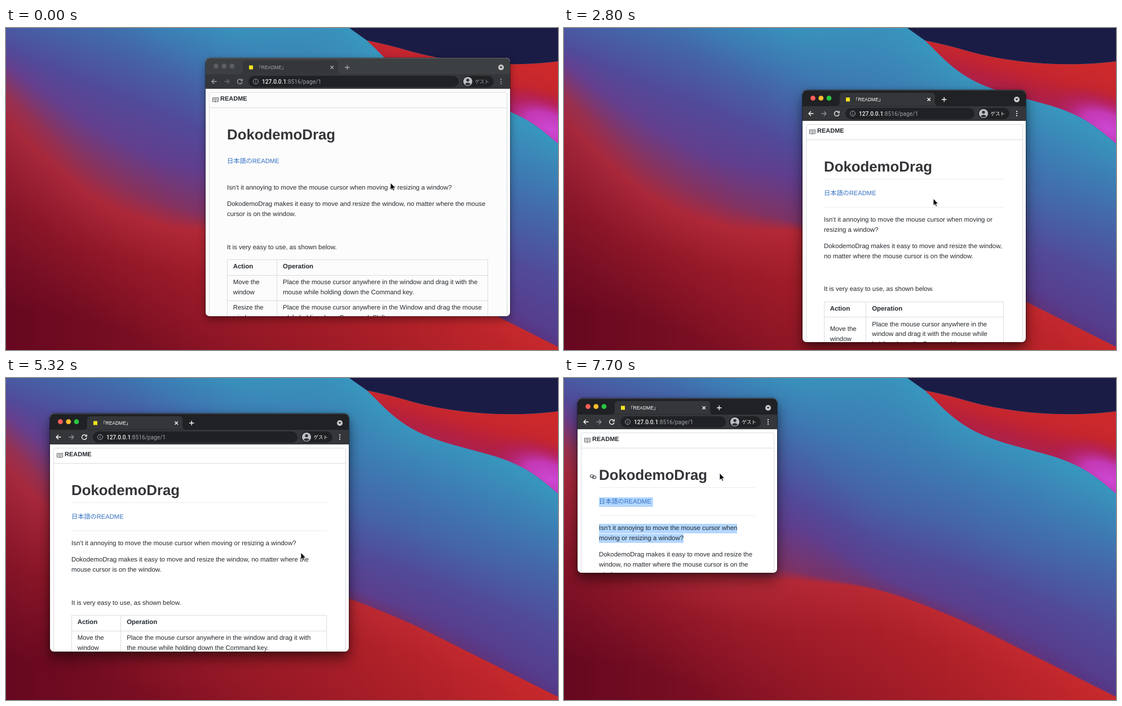
These frames come from a looping animation (979 px wide and 572 px high, 8 s). An HTML page with a canvas:

```html
<!DOCTYPE html>
<html lang="en">
<head>
<meta charset="utf-8">
<title>Window dragging</title>
<style>
html, body { margin: 0; width: 100%; height: 100%; overflow: hidden; background: #7a1026; }
#stage { position: absolute; left: 0; top: 0; width: 979px; height: 572px; overflow: hidden; }
#stage * { box-sizing: border-box; }
#win, #cursor { position: absolute; left: 0; top: 0; }
#win {
  --strip: #202124; color: #fff; border-radius: 7px;
  box-shadow: 0 0 0 .6px rgba(0,0,0,.7), 0 12px 24px rgba(0,0,0,.5), 0 2px 8px rgba(0,0,0,.2);
}
#win.idle {
  --strip: #3d4042; color: #a6a8ab;
  box-shadow: 0 0 0 .6px rgba(0,0,0,.6), 0 6px 14px rgba(0,0,0,.38);
}
#clip { position: absolute; inset: 0; overflow: hidden; border-radius: 7px; background: #fff; }
#clip::after { content: ""; position: absolute; inset: 0; height: 55px; border-radius: 7px 7px 0 0; box-shadow: inset 0 1px 0 rgba(255,255,255,.2); }
.idle #clip { background: #fcfcfc; }
.bar, #omni, .box, .body, .abs { position: absolute; }
.bar { left: 0; right: 0; top: 0; height: 28.5px; background: var(--strip); }
.tools { top: 28.5px; height: 26.5px; background: #35363a; }
#omni, #pill { position: absolute; top: 32px; height: 19.5px; border-radius: 10px; background: #202124; }
#omni { left: 76px; right: 91px; }
#pill { right: 29px; width: 56px; }
svg { position: absolute; top: 0; overflow: visible; }
svg text { fill: currentColor; stroke: none; font: 8.5px "Liberation Sans", "Noto Sans CJK JP", "Noto Sans CJK", sans-serif; }
svg .url { font: 500 10.2px Roboto, sans-serif; }
.idle .light { fill: #5c5e61; }
.box { left: 5.5px; right: 5.5px; top: 61px; bottom: -9px; border: 1px solid #d9dce0; border-radius: 3px; }
.box::before { content: ""; position: absolute; left: 0; right: 0; top: 26px; height: 1px; background: #d9dce0; }
.body {
  left: 38px; right: 39px; top: 0; color: #24292e; text-rendering: geometricPrecision; font-kerning: none;
  font: 11.45px/17.7px "Liberation Sans", "Noto Sans CJK JP", "Noto Sans CJK", Arial, sans-serif;
}
.head { left: -12px; top: 65.4px; font-weight: bold; font-size: 11px; }
h1 { position: absolute; margin: 0; top: 121.5px; left: 0; font-size: 25.8px; line-height: 30px; color: #333438; }
.rule { left: 0; right: 0; height: 1px; background: #eaecef; }
.idle .rule { display: none; }
.link { top: 176.2px; color: #3270c2; font-size: 11.2px; white-space: nowrap; }
.flow { position: absolute; top: 223.2px; left: 0; right: 0; }
p { margin: 0 0 11.6px; min-height: 17.7px; }
.sel { background: #b3d7ff; padding: 2.4px 0; }
.link .sel { padding-right: 3px; }
table { width: 100%; border-collapse: collapse; table-layout: fixed; }
td, th { border: 1px solid #d9dce0; padding: 4.4px 9.7px; text-align: left; vertical-align: middle; }
</style>
</head>
<body>
<div id="stage">
<canvas id="bg" width="979" height="572"></canvas>
<div id="win"><div id="clip">
  <div class="bar"></div><div class="bar tools"></div><div id="omni"></div><div id="pill"></div>
  <svg width="270" height="55" fill="none" stroke="currentColor" stroke-width="1.3">
    <g stroke="none">
      <circle class="light" cx="18.5" cy="14.7" r="4.4" fill="#ff5f57"/>
      <circle class="light" cx="32.8" cy="14.7" r="4.4" fill="#febc2e"/>
      <circle class="light" cx="47" cy="14.7" r="4.4" fill="#28c840"/>
      <path fill="#35363a" d="M60 28.5q6 0 6-6V11q0-6 6-6H229q6 0 6 6V22.5q0 6 6 6Z"/>
      <rect x="77" y="13.5" width="7" height="7" fill="#f4e51c"/>
    </g>
    <text x="90" y="20">「README」</text>
    <path d="M221.5 14.3l5.4 5.4m0-5.4l-5.4 5.4M247 17h8.4M251.2 12.8v8.4"/>
    <path d="M19.5 42H11m4-4l-4 4 4 4"/>
    <path opacity=".45" d="M33.5 42H42m-4-4l4 4-4 4"/>
    <path d="M64 39.2A4.3 4.3 0 1 0 65 43M65.2 37.4v3.3h-3.3"/>
    <g stroke="#a5a8ac" stroke-width="1"><circle cx="89" cy="42" r="4.5"/><path d="M89 41.4v3M89 39.2v1"/></g>
    <text class="url" x="100" y="45.6" style="fill:#f1f2f3">127.0.0.1<tspan style="fill:#9da1a6;font-weight:400">:8516/page/1</tspan></text>
  </svg>
  <svg width="100" height="55" style="right:0" fill="currentColor">
    <circle cx="84" cy="17" r="5" fill="#c9cbcd"/><path d="M81.4 15.6h5.2L84 18.8Z" fill="#202124"/>
    <circle cx="25" cy="42" r="8" fill="#bdc1c6"/>
    <circle cx="25" cy="39.6" r="2.7" fill="#303236"/><path d="M19.6 46.4q5.4-5 10.8 0-5.4 5-10.8 0Z" fill="#303236"/>
    <text x="37.5" y="45.2">ゲスト</text>
    <circle cx="84" cy="38.2" r="1.1"/><circle cx="84" cy="42" r="1.1"/><circle cx="84" cy="45.8" r="1.1"/>
  </svg>
  <div class="box"></div>
  <svg width="30" height="90" fill="none" stroke="#444a50">
    <path d="M12.5 70.8h4q1 0 1 1 0-1 1-1h4v7h-4q-1 0-1 1 0-1-1-1h-4ZM17.5 72v6M14 73h2M14 75h2M19 73h2M19 75h2" stroke-width=".9"/>
    <g id="anchor" stroke-width="1.1"><rect x="22.5" y="136" width="6.4" height="4.6" rx="2.3"/><rect x="26.4" y="138" width="6.4" height="4.6" rx="2.3"/></g>
  </svg>
  <div class="body">
    <div class="abs head">README</div>
    <h1>DokodemoDrag</h1>
    <div class="abs rule" style="top:158px"></div>
    <div class="abs link"><span id="link">日本語のREADME</span></div>
    <div class="abs rule" style="top:208px"></div>
    <div class="flow">
      <p><span id="ask">Isn’t it annoying to move the mouse cursor when moving or resizing a window?</span></p>
      <p>DokodemoDrag makes it easy to move and resize the window, no matter where the mouse cursor is on the window.</p>
      <p></p>
      <p>It is very easy to use, as shown below.</p>
      <table>
        <tr><th id="col">Action</th><th>Operation</th></tr>
        <tr><td>Move the window</td><td>Place the mouse cursor anywhere in the window and drag it with the mouse while holding down the Command key.</td></tr>
        <tr><td>Resize the window</td><td>Place the mouse cursor anywhere in the Window and drag the mouse while holding down Command, Shift.</td></tr>
      </table>
    </div>
  </div>
</div></div>
<svg id="cursor" width="12" height="18"><path d="M0 0V12.5L2.8 9.9 4.8 14.3 6.7 13.5 4.8 9.2H8.7Z" fill="#000" stroke="#fff" stroke-width=".9"/></svg>
</div>
<script>
const $ = id => document.getElementById(id);
const mix = (a, b, k) => a + (b - a) * k;

// Wallpaper: colour contours, each with heights at evenly spaced columns
const contours = [
  ['3895bd', '3895bd', [-190, -130, -60, -10, -20, 78, 131, 205]],
  ['3d78b1', '3d7cb3', [-90, -50, 20, 75, 120, 170, 225, 280]],
  ['4563a7', '4565a8', [-25, 20, 70, 140, 215, 260, 310, 350]],
  ['514b9a', '514b99', [35, 95, 150, 215, 290, 335, 390, 450]],
  ['663f8e', '553d8d', [65, 165, 235, 270, 350, 405, 465, 545]],
  ['98304f', '553585', [120, 245, 310, 345, 376, 427, 495, 565]],
  ['a5283c', 'c7292c', [165, 290, 352, 362, 378, 429, 497, 567]],
  ['871528', 'c4272a', [320, 385, 430, 450, 450, 490, 540, 600]],
  ['660820', 'b82328', [500, 520, 572, 620, 640, 650, 700, 700]]
];

function spline(v, u) {
  const i = Math.min(v.length - 2, Math.floor(u)), k = u - i;
  const b = v[i], c = v[i + 1], a = v[i - 1] ?? 2 * b - c, d = v[i + 2] ?? 2 * c - b;
  return b + k / 2 * (c - a + k * (2 * a - 5 * b + 4 * c - d + k * (3 * (b - c) + d - a)));
}

function blend(a, b, k) {
  const part = (s, i) => parseInt(s.substr(i, 2), 16);
  return `rgb(${[0, 2, 4].map(i => Math.round(mix(part(a, i), part(b, i), k)))})`;
}

function paintWallpaper() {
  const g = $('bg').getContext('2d'), top = -240, span = 960;
  for (let x = 0; x < 979; x++) {
    const grad = g.createLinearGradient(0, top, 0, top + span);
    for (const [left, right, ys] of contours)
      grad.addColorStop((spline(ys, x / 978 * 7) - top) / span, blend(left, right, x / 978));
    g.fillStyle = grad;
    g.fillRect(x, 0, 1, 572);
  }
  const ridge = 'Q680 30 720 42C800 64 900 70 979 59';
  const band = new Path2D('M609 0L640 22' + ridge + 'V205C950 180 930 163 890 147S790 122 740 100S665 45 640 22Z');
  const red = g.createLinearGradient(860, 55, 835, 145);
  [['#cb292b', 0], ['#c4252f', .35], ['#b4203f', .65], ['#a62259', 1]].forEach(([c, k]) => red.addColorStop(k, c));
  g.fillStyle = red;
  g.fill(band);
  g.save();
  g.clip(band);
  g.translate(968, 180);
  g.rotate(.45);
  g.scale(1, .5);
  const glow = g.createRadialGradient(0, 0, 0, 0, 0, 125);
  [['rgba(205,72,212,1)', 0], ['rgba(196,58,186,.95)', .4], ['rgba(180,35,120,.5)', .7], ['rgba(170,30,80,0)', 1]]
    .forEach(([c, k]) => glow.addColorStop(k, c));
  g.fillStyle = glow;
  g.fillRect(-130, -130, 260, 260);
  g.restore();
  g.fillStyle = '#1b1c45';
  g.fill(new Path2D('M609 0L640 22' + ridge + 'V0Z'));
}

// Tracks of [step, a, b]
const pointer = [
  [0, 682, 275], [1, 708, 300], [2, 720, 312], [4, 720, 312], [6, 729, 312], [7, 729, 312],
  [10, 710, 297], [11, 680, 275], [13, 620, 266], [15, 585, 285], [18, 587, 304], [19, 655, 303],
  [21, 735, 292], [23, 720, 280], [25, 720, 280], [28, 800, 312], [30, 865, 345], [32, 880, 355],
  [33, 850, 353], [36, 523, 310], [39, 484, 306], [41, 484, 302], [42, 485, 293], [44, 481, 281],
  [46, 481, 281], [49, 390, 220], [52, 276, 169]
];
const place = [
  [0, 354, 53], [1, 395, 87], [2, 423, 110], [32, 423, 110], [33, 400, 106], [36, 78, 63],
  [37, 45, 61], [39, 27, 61], [41, 27, 57], [42, 27, 51], [44, 24, 36]
];
const size = [
  [0, 540, 459], [7, 540, 459], [9, 537, 456], [11, 520, 441], [14, 431, 413], [16, 396, 432],
  [19, 396, 448], [20, 462, 447], [22, 540, 436], [24, 530, 423], [46, 530, 423], [47, 515, 415],
  [50, 410, 340], [52, 354, 310]
];

function at(track, n) {
  const i = track.findIndex(key => key[0] > n);
  if (i < 0) return track[track.length - 1].slice(1);
  const [p, q] = [track[i - 1], track[i]], k = (n - p[0]) / (q[0] - p[0]);
  return [mix(p[1], q[1], k), mix(p[2], q[2], k)].map(Math.round);
}

function draw(now) {
  const n = Math.min(52, Math.floor((now % 8000 + 16) / 148));
  const [x, y] = at(place, n), [w, h] = at(size, n), [cx, cy] = at(pointer, n);
  const win = $('win');
  win.style.transform = `translate(${x}px,${y}px)`;
  win.style.width = w + 'px';
  win.style.height = h + 'px';
  win.className = n < 8 ? 'idle' : '';
  $('col').style.width = 43.5 + (w - 77) * .097 + 'px';
  $('ask').className = n >= 48 ? 'sel' : '';
  $('link').className = n >= 49 ? 'sel' : '';
  $('anchor').style.display = n >= 51 ? '' : 'none';
  $('cursor').style.transform = `translate(${cx}px,${cy}px)`;
  requestAnimationFrame(draw);
}

paintWallpaper();
requestAnimationFrame(draw);
</script>
</body>
</html>
```
